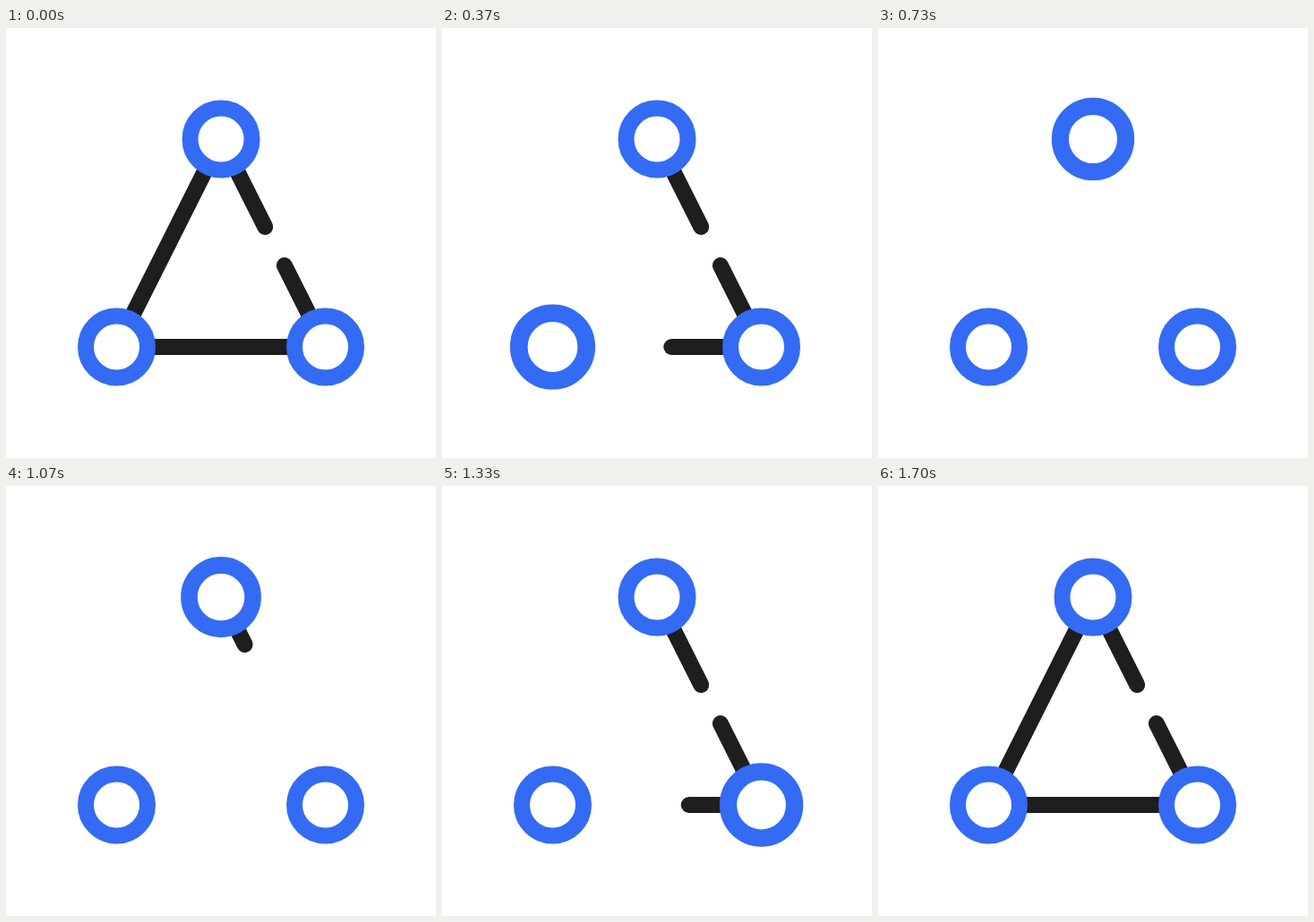
These frames come from a looping animation (480x480 px, 1800 ms). An HTML page with a canvas:

```html
<!DOCTYPE html>
<html>
<head>
<meta charset="utf-8">
<style>
html, body { margin: 0; width: 100%; height: 100%; overflow: hidden; background: #fff; }
canvas { display: block; }
</style>
</head>
<body>
<canvas id="stage" width="480" height="480"></canvas>
<script>
const ctx = document.getElementById('stage').getContext('2d');
const LOOP = 1800, FPS = 30, SPAN = 6.83, INSET = 41;

const top_ = [240, 124], left = [123.5, 356], right = [356.5, 356];

// Times are in frames: out = line starts to vanish, back = it starts to return.
const edges = [
  { from: top_, to: left, out: 0, back: 45, span: 6 },
  { from: left, to: right, out: 6.85, back: 38.2, span: SPAN },
  { from: right, to: top_, out: 13.75, back: 31.3, span: SPAN, gap: [101.8, 149.9] }
];

const clamp = x => Math.min(1, Math.max(0, x));
const bump = x => Math.sin(Math.PI * clamp(x));

function drawEdge({ from, to, out, back, span, gap }, f) {
  const dx = to[0] - from[0], dy = to[1] - from[1], len = Math.hypot(dx, dy);
  const hidden = clamp((f - out) / SPAN) - clamp((f - back) / span);
  if (hidden >= 1) return;
  const end = len - INSET;
  const cut = INSET + hidden * (end - INSET);
  const pieces = gap ? [[INSET, gap[0]], [gap[1], end]] : [[INSET, end]];
  const point = d => [from[0] + dx * d / len, from[1] + dy * d / len];
  for (const [a, b] of pieces) {
    if (cut >= b) continue;
    ctx.beginPath();
    ctx.moveTo(...point(Math.max(a, cut)));
    ctx.lineTo(...point(b));
    ctx.stroke();
  }
}

function drawNode({ to, out, back, span }, f) {
  const scale = 1 + 0.1 * (bump((f - out - SPAN) / SPAN) + bump((f - back) / span));
  ctx.lineWidth = 18 * scale;
  ctx.beginPath();
  ctx.arc(to[0], to[1], 34.5 * scale, 0, 2 * Math.PI);
  ctx.stroke();
}

function draw(ms) {
  const f = Math.floor((ms % LOOP) * FPS / 1000 + 0.15);
  ctx.fillStyle = '#fff';
  ctx.fillRect(0, 0, 480, 480);
  ctx.lineCap = 'round';
  ctx.lineWidth = 18;
  ctx.strokeStyle = '#1e1e1e';
  edges.forEach(e => drawEdge(e, f));
  ctx.strokeStyle = '#336bf5';
  edges.forEach(e => drawNode(e, f));
}

const start = performance.now();
function tick() {
  draw(performance.now() - start);
  requestAnimationFrame(tick);
}
tick();
</script>
</body>
</html>
```
